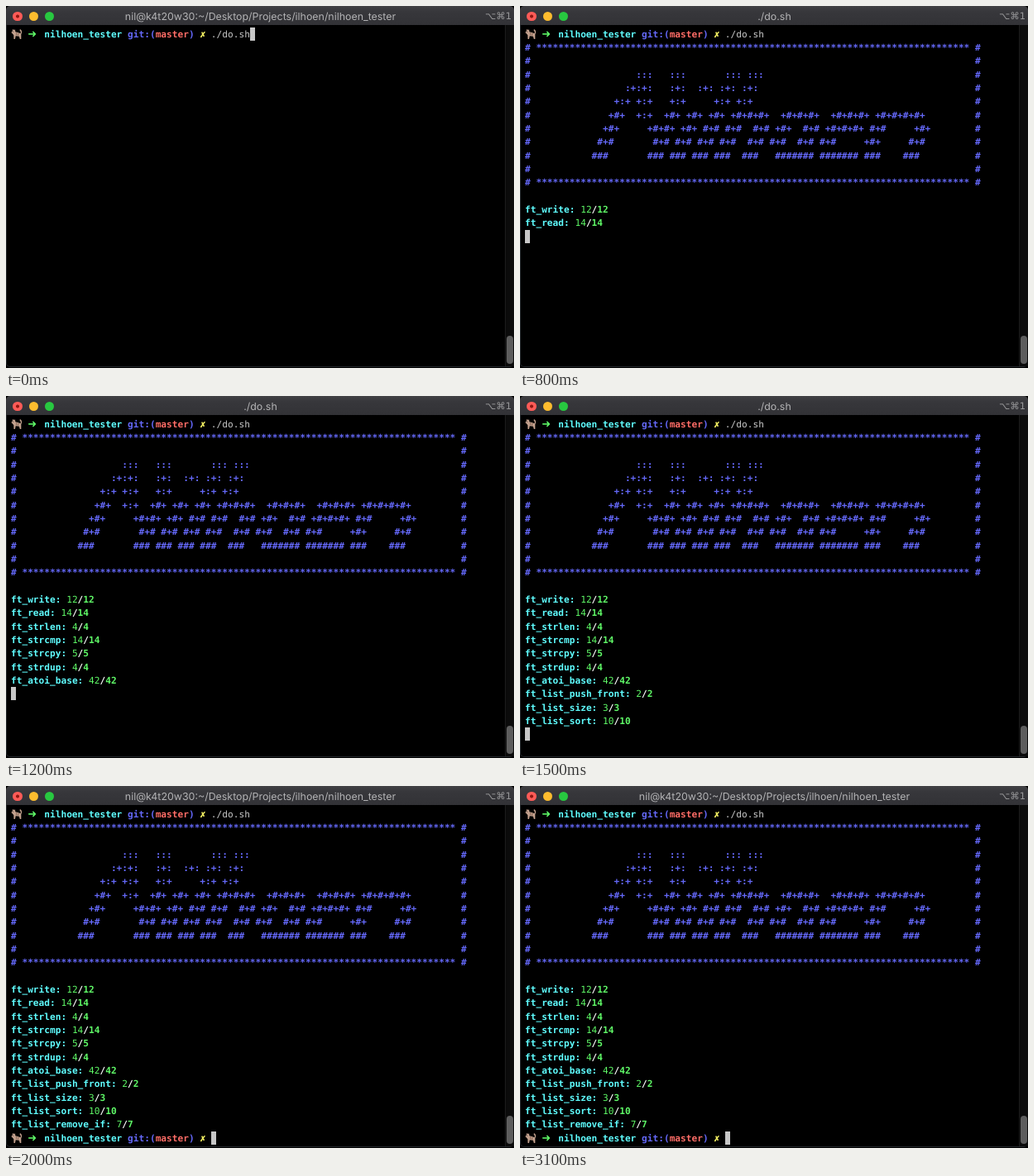
Write an HTML page that moves like this. It is 614 px wide and 438 px high and loops after 3.2 s.

```html
<!DOCTYPE html>
<html lang="en">
<head>
<meta charset="utf-8">
<title>Terminal test run</title>
<style>
  html, body { margin: 0; width: 100%; height: 100%; overflow: hidden; background: #000; }
  #window { position: relative; width: 614px; height: 438px; overflow: hidden; background: #000; text-rendering: geometricPrecision; }
  #window > * { position: absolute; }
  #bar { left: 0; top: 0; width: 614px; height: 23px; background: linear-gradient(#414144, #37373b 30%, #323236); border-radius: 5px 5px 0 0; }
  #title { left: 0; width: 615px; top: 0; text-align: center; color: #b3b3b5; font: 12.4px/26px Inter, sans-serif; }
  #shortcut { right: 3px; top: 0; color: #98989a; font: 11.5px/24px "DejaVu Sans", sans-serif; }
  .light { top: 6.7px; width: 11.4px; height: 11.4px; border-radius: 50%; }
  #frame { left: 0; top: 23px; width: 612px; height: 413px; border: solid #24282c; border-width: 0 1px 1px; border-radius: 0 0 5px 5px; }
  #track { left: 603px; top: 23px; width: 10px; height: 413px; background: #0b0b0b; border-left: 1px solid #1b1b1b; }
  #thumb { left: 605px; top: 399px; width: 8px; height: 34px; border-radius: 4px; background: #5d5d5d; }
  #screen { left: 6px; top: 26.7px; color: #c7c7c7; font: 11.16px/16.33px "DejaVu Sans Mono", monospace; }
  .row { height: 16.33px; white-space: pre; }
  .blue { color: #6569fb; }
  .cyan { color: #5ffdff; }
  .green { color: #5ff967; }
  .red { color: #ff6d67; }
  .yellow { color: #fefb67; -webkit-text-stroke: .5px; }
  .white { color: #fff; }
  .cat, .arrow { display: inline-block; width: 20.15px; height: 16px; vertical-align: top; }
  .arrow { font: bold 13px/16px "DejaVu Sans", sans-serif; }
  #cursor { width: 6.5px; height: 16px; background: #c7c7c7; }
</style>
</head>
<body>
<div id="window">
  <div id="frame"></div>
  <div id="track"></div>
  <div id="thumb"></div>
  <div id="bar"></div>
  <div class="light" style="left:8.3px;background:radial-gradient(circle,#8f1812 1.6px,#fc5b57 2.4px)"></div>
  <div class="light" style="left:27.6px;background:#fdbc2e"></div>
  <div class="light" style="left:46.8px;background:#28c840"></div>
  <div id="title"></div>
  <div id="shortcut">⌥⌘1</div>
  <div id="screen"></div>
  <div id="cursor"></div>
</div>
<script>
const LOOP = 3200, CELL = 6.72, LINE = 16.33;
const START = 100, BANNER = 200, DONE = 1700;
const FOLDER = 'nil@k4t20w30:~/Desktop/Projects/ilhoen/nilhoen_tester';

// name, score, time of appearance
const tests = [
  ['write', 12, 600], ['read', 14, 800], ['strlen', 4, 900],
  ['strcmp', 14, 1000], ['strcpy', 5, 1100], ['strdup', 4, 1100],
  ['atoi_base', 42, 1200], ['list_push_front', 2, 1300],
  ['list_size', 3, 1400], ['list_sort', 10, 1500], ['list_remove_if', 7, 1600]
];

const lettering = [
  '        :::   :::       ::: :::',
  '      :+:+:   :+:  :+: :+: :+:',
  '    +:+ +:+   +:+     +:+ +:+',
  '   +#+  +:+  +#+ +#+ +#+ +#+#+#+  +#+#+#+  +#+#+#+ +#+#+#+#+',
  '  +#+     +#+#+ +#+ #+# #+#  #+# +#+  #+# +#+#+#+ #+#     +#+',
  ' #+#       #+# #+# #+# #+#  #+# #+#  #+# #+#     +#+     #+#',
  '###       ### ### ### ###  ###   ####### ####### ###    ###'
];

const bold = (color, text) => `<b class="${color}">${text}</b>`;

const cat = `<svg class="cat" viewBox="0 0 20.15 16">
  <g transform="translate(-.8 -.6) scale(.82 .98)">
  <path d="M3 4L4 1.5 5.5 3 7 2 7.5 5 12 6 15 7Q16.5 5 14 3.5 13.5 1.5 15 2 18.5 4.5 16 8L16 14H14.2L13 10.5 8 10 7 14H5.2L5 9 3 7 1.5 6Z" fill="#c2a08d"/>
  <path d="M9 6V9M11.5 6.5V9.5" stroke="#7a5a4a" fill="none"/>
  <circle cx="4.2" cy="4.7" r=".6" fill="#222"/></g></svg>`;

const prompt = cat + '<span class="arrow green">➜</span>' + bold('cyan', 'nilhoen_tester') + ' ' +
  bold('blue', 'git:(') + bold('red', 'master') + bold('blue', ')') + ' ' + bold('yellow', '✗') + ' ';

const boxed = text => bold('blue', '# ' + text.padEnd(78) + ' #');
const stars = boxed('*'.repeat(78));
const banner = [stars, boxed(''), ...lettering.map(s => boxed(' '.repeat(10) + s)), boxed(''), stars, ''];

const result = ([name, score]) =>
  bold('cyan', `ft_${name}:`) + ` <span class="green">${score}</span>` + bold('white', '/') + bold('green', score);

const byId = id => document.getElementById(id);
let shown = '';

function draw(time) {
  const running = time >= START && time < DONE;
  const rows = [prompt + './do.sh'];
  let column = 43;
  if (time >= BANNER) rows.push(...banner);
  rows.push(...tests.filter(test => time >= test[2]).map(result));
  if (time >= START) {
    column = running ? 0 : 36;
    rows.push(running ? '' : prompt);
  }

  const html = rows.map(row => `<div class="row">${row}</div>`).join('');
  if (html === shown) return;
  shown = html;
  byId('screen').innerHTML = html;
  byId('title').textContent = running ? './do.sh' : FOLDER;
  byId('cursor').style.left = 5.6 + column * CELL + 'px';
  byId('cursor').style.top = 25.6 + (rows.length - 1) * LINE + 'px';
}

function tick() {
  draw(performance.now() % LOOP);
  requestAnimationFrame(tick);
}
tick();
</script>
</body>
</html>
```
